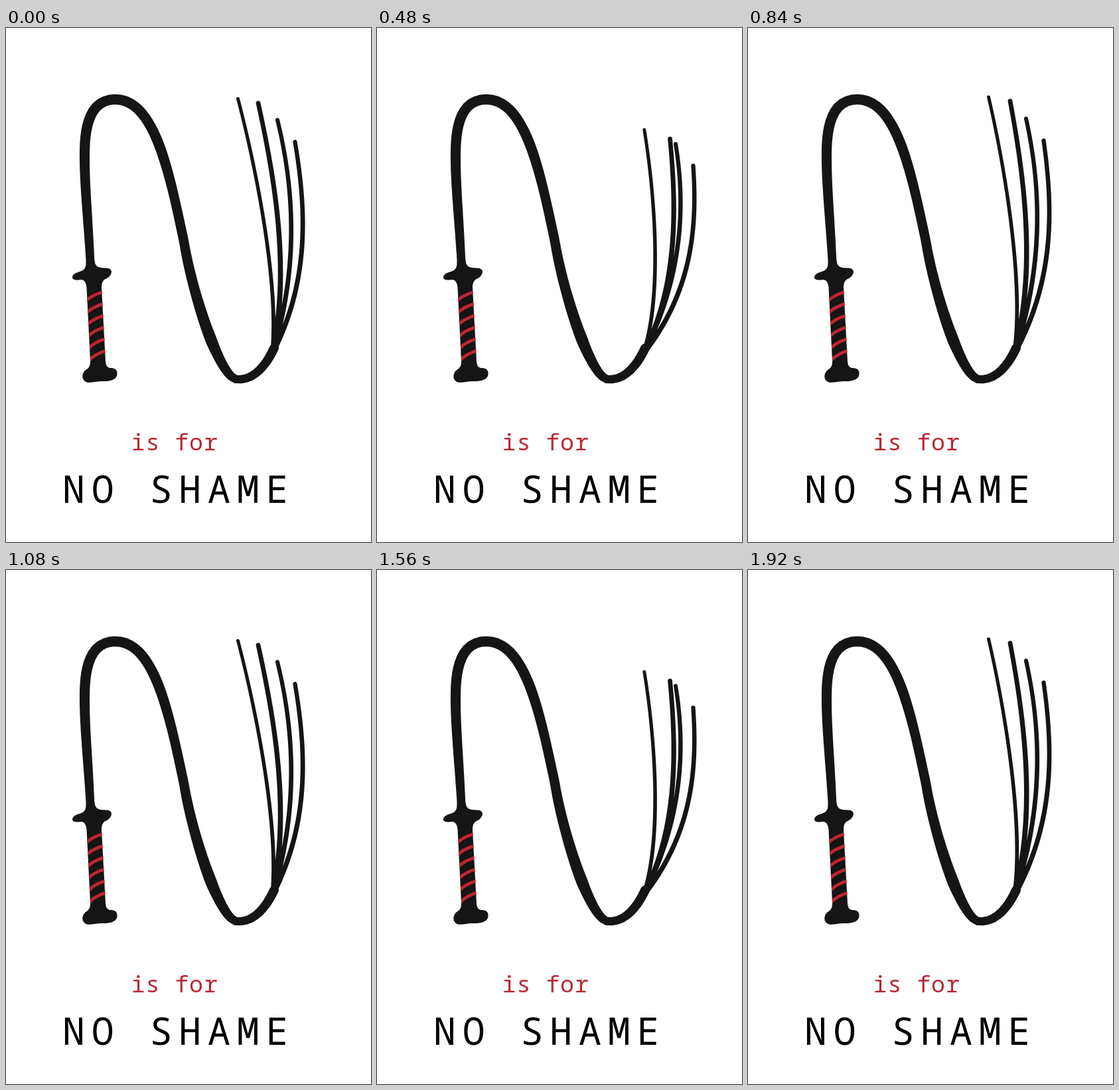
Write an HTML page that moves like this. It is 550 by 774 pixels and loops after 1.96 s.

```html
<!DOCTYPE html>
<html lang="en">
<head>
<meta charset="utf-8">
<title>N is for No Shame</title>
<style>
  html, body { margin: 0; width: 100%; height: 100%; overflow: hidden; background: #fff; }
  svg { display: block; width: 550px; height: 774px; }
  text { font-family: "Noto Sans Mono", "DejaVu Sans Mono", monospace; white-space: pre; }
</style>
</head>
<body>
<svg viewBox="0 0 550 774">
  <clipPath id="grip"><path d="M121 385H144L150.5 505H127.5Z"/></clipPath>
  <g fill="#151515">
    <path id="rope"/>
    <path id="tails"/>
    <path d="M120.5 352C121 361 118 365 111 367C103 369 100 372 100 376C101 380 107 380 112 379
      C118 378 121 384 121.5 391L127 502C127 509 125 512 120 515C115 519 114 526 117 530
      C120 535 127 534 134 533C142 531 149 533 157 531C165 529 168 525 167.5 519
      C167 513 162 512 157 512C152 511 150.5 508 150 502L144 391C144 384 146 379 152 377
      C157 374 160 369 158.5 365C156 360 149 362 143 361C137 360 134 357 133.5 350Z"/>
  </g>
  <g id="bands" clip-path="url(#grip)" fill="none" stroke="#bd2532" stroke-width="4.8"/>
  <text x="188.5" y="636" font-size="35" letter-spacing=".9" fill="#b92a35">is for</text>
  <text x="85" y="715" font-size="56.500" letter-spacing="9.900">NO SHAME</text>
</svg>
<script>
const $ = id => document.getElementById(id);
const ropeLine = `M127.5 362C124 290 118 235 118.5 190C118.5 140 130 107.5 165 107.5
  C225 107.5 246.6 221.5 268 321C280 396 322 529.5 349 529.3C374 530 392 508 404 482`;
const ropeWidths = [12.5, 14, 15, 15.5, 15.5, 15.5, 14.5, 14.5, 15.5, 17.5, 12.5, 14];

// Each tail is a curve from its tip through two handles to the shared root
const root = [401, 491];
const tails = [
  { curve: [[349.5, 106.5], [378, 215], [412, 390], root], width: 5.5, reach: 1.3 },
  { curve: [[380, 113], [407, 235], [428, 370], root], width: 7.5, reach: 1.5 },
  { curve: [[409, 138.5], [434, 240], [442, 360], root], width: 6.8, reach: 1 },
  { curve: [[435.5, 171.5], [452, 270], [459, 380], root], width: 7, reach: 1 }
];

// Time in one swing, sway to the right, droop
const swing = [[0, 0, 0], [320, 5, 5], [480, 41, 36], [640, 4, 2], [840, 10, -2], [1080, 0, 0]];

const lerp = (a, b, t) => a + (b - a) * t;

// Outline of a round-ended stroke whose thickness runs evenly through the widths
function brush(d, widths) {
  const path = document.createElementNS("http://www.w3.org/2000/svg", "path");
  path.setAttribute("d", d);
  const length = path.getTotalLength(), steps = Math.ceil(length / 8);
  const left = [], right = [];
  for (let i = 0; i <= steps; i++) {
    const at = length * i / steps;
    const { x, y } = path.getPointAtLength(at);
    const p = path.getPointAtLength(at - 1), q = path.getPointAtLength(at + 1);
    const place = i / steps * (widths.length - 1);
    const k = Math.min(Math.floor(place), widths.length - 2);
    const r = lerp(widths[k], widths[k + 1], place - k) / 2;
    const angle = Math.atan2(q.y - p.y, q.x - p.x);
    const nx = -Math.sin(angle) * r, ny = Math.cos(angle) * r;
    left.push(`${x + nx} ${y + ny}`);
    right.unshift(`${x - nx} ${y - ny}`);
  }
  const cap = w => `A${w / 2} ${w / 2} 0 0 0 `;
  return "M" + left.join("L") + cap(widths.at(-1)) + right.join("L") + cap(widths[0]) + left[0] + "Z";
}

function tailShape({ curve, width, reach }, sway, droop) {
  const height = root[1] - curve[0][1];
  const bent = curve.map(([x, y]) => {
    const pull = reach * ((root[1] - y) / height) ** .8;
    return [x + sway * pull, y + droop * pull];
  });
  return brush(`M${bent[0]}C${bent.slice(1).join(" ")}`, [width * .9, width, width + .5]);
}

function draw(time) {
  const now = Math.floor(time % 1960 / 40) * 40 % 1080;
  const next = swing.findIndex(key => key[0] > now);
  const a = swing[next - 1], b = swing[next];
  const mix = (now - a[0]) / (b[0] - a[0]);
  const sway = lerp(a[1], b[1], mix), droop = lerp(a[2], b[2], mix);
  $("tails").setAttribute("d", tails.map(tail => tailShape(tail, sway, droop)).join(""));
}

$("rope").setAttribute("d", brush(ropeLine, ropeWidths));
for (let i = 0; i < 6; i++) {
  $("bands").innerHTML += `<path d="M${119 + i * 1.2} ${413 + i * 17.6}q8 -10 27 -15.500"/>`;
}

const start = performance.now();
function tick() {
  draw(performance.now() - start);
  requestAnimationFrame(tick);
}
tick();
</script>
</body>
</html>
```
